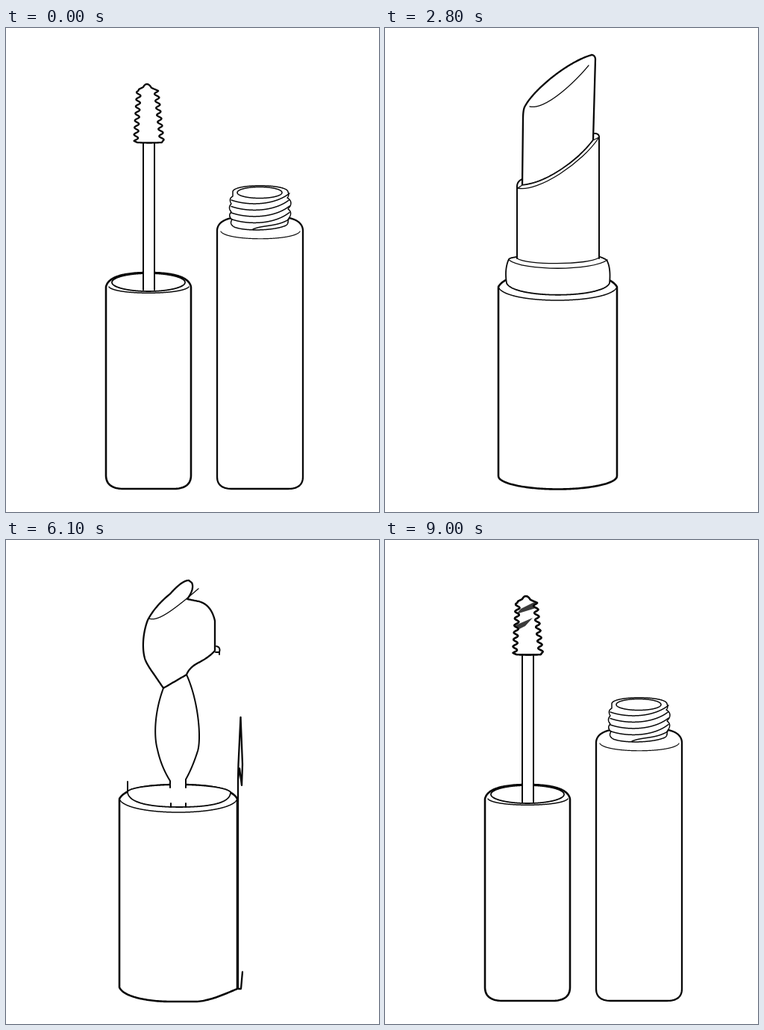
Animation of 500x647 px, one loop 9100 ms. Source, as an HTML page with a canvas:

```html
<!DOCTYPE html>
<html lang="en">
<head>
<meta charset="utf-8">
<title>Mascara and lipstick</title>
<style>
html, body { margin: 0; height: 100%; overflow: hidden; background: #fff; }
canvas { display: block; }
</style>
</head>
<body>
<canvas id="stage" width="500" height="647"></canvas>
<script>
const ctx = document.getElementById('stage').getContext('2d');
const STEP = 100, STEPS = 91, TURN = 73, SAMPLES = 400;
const KEYS = [0, 3, 12, 20];
const INK = '#080808';
ctx.lineJoin = ctx.lineCap = 'round';

const ruler = document.createElementNS('http://www.w3.org/2000/svg', 'path');
function sample(d) {
  ruler.setAttribute('d', d);
  const length = ruler.getTotalLength();
  return Array.from({ length: SAMPLES + 1 }, (_, i) => {
    const p = ruler.getPointAtLength(length * i / SAMPLES);
    return [p.x, p.y];
  });
}

// Poses: mascara, mascara pushed together, half-way shape, lipstick.
const capPush = ([x, y]) => [x * 1.0172 + 17.7, y];
const tubePush = ([x, y]) => [x * 0.817 + 41.7, y];
const squeeze = ([x, y]) => [314 + (x - 341) * 0.03, y + 23];

function part(width, push, mascara, middle, lipstick) {
  const first = sample(mascara);
  const mid = typeof middle === 'function' ? first.map(middle) : sample(middle);
  return { width, poses: [first, first.map(push), mid, lipstick ? sample(lipstick) : mid] };
}

function pose({ poses }, g) {
  const i = g < KEYS[1] ? 0 : g < KEYS[2] ? 1 : 2;
  const k = Math.min(1, (g - KEYS[i]) / (KEYS[i + 1] - KEYS[i]));
  return poses[i].map(([x, y], n) => {
    const [u, v] = poses[i + 1][n];
    return [x + (u - x) * k, y + (v - y) * k];
  });
}

function brushOutline() {
  const wave = (y, top) => 3 * Math.cos((y - top) / 9.4 * 2 * Math.PI);
  let d = 'M189 75Q186 75 184 79L178 82';
  for (let y = 84; y <= 151; y++) d += `L${178 - 0.06 * (y - 84) - wave(y, 86)} ${y}`;
  d += 'L176 153Q192 154 209 153';
  for (let y = 151; y >= 84; y--) d += `L${201.5 + 0.11 * (y - 84) + wave(y, 83.5)} ${y}`;
  return d + 'L195 80Q192 75 189 75Z';
}

const tube = part(2.3, tubePush,
  'M283 270V600Q283 616 303 616H378Q398 616 398 600V270Q397 258 380 254H302Q284 258 283 270Z',
  'M311 320V600H315L317 577L315 600H311V320L313 305L316 328L317 300L314.5 236L311.5 300Z',
  'M311 346V599V346Z');
const neck = [
  'M304 219C304 208 377 208 378 219Q380 224 377 227Q384 231 381 238L378 242Q384 246 380 253L378 256Q379 262 375 264C360 271 320 272 306 266Q299 262 303 256Q297 251 302 246Q297 240 302 235Q298 228 304 225Z',
  'M310 220A30 7.5 0 0 0 370 220A30 7.5 0 0 0 310 220Z',
  ...[0, 1, 2, 3].map(i => {
    const y = 8.5 * i;
    return `M302 ${230 + y}C325 ${238 + y} 360 ${237 + y} 380 ${221 + y}`;
  }),
  'M331 269C345 263 362 266 379 256'
].map(d => part(1.5, tubePush, d, squeeze));
const tubeShoulder = part(1.2, tubePush, 'M288 272C296 285 386 285 394 272', squeeze);

const body = part(2.6, capPush,
  'M134 346V598Q134 616 158 616H224Q248 616 248 598V346Q244 327 191 327Q138 327 134 346Z',
  'M152 346V598C158 612 195 617 220 617H255C275 616 295 606 310 600V346Q300 327 231 327Q162 327 152 346Z',
  'M152 346V599A79.5 17.5 0 0 0 311 599V346Q300 327 231 327Q162 327 152 346Z');
const shoulder = part(1.5, capPush,
  'M138 346C146 357 236 357 245 346',
  'M152 346C160 370 302 370 310 346',
  'M152 346C160 370 302 370 311 346');
const rim = part(1.8, capPush,
  'M142 340A49 12 0 0 0 240 340A49 12 0 0 0 142 340Z',
  'M163 336C163 352 195 357 232 357C280 357 301 350 301 337C290 324 175 324 163 336Z',
  'M166 309Q160 322 163 341C172 362 292 362 301 341Q303 320 297 310Q290 306 287 306H177Q168 307 166 309Z');
const left = part(2, capPush, 'M184 153V350',
  'M211 198C199 230 198 262 203 280Q208 303 220 322V331',
  'M184 202Q177 205 177 212V308');
const right = part(2, capPush, 'M199 153V350',
  'M242 180C258 215 262 265 257 282Q250 304 241 320V331',
  'M281 141Q287 141 287 146V308');
const tip = part(2.3, capPush, brushOutline(),
  'M245 54Q236 54 220 72Q200 88 190 107C183 125 182 148 187 161Q190 168 198 179L211 198L242 180Q246 170 258 164Q272 157 280 148V108Q275 86 258 82L243 79Q253 65 249 57Z',
  'M277 36C245 45 200 82 188 104Q185 108 185 122L184 210C215 208 258 178 279 150L282 41Q281 36 277 36Z');
const highlight = part(1.3, capPush, 'M189 78H190',
  'M192 105C203 109 222 96 258 65',
  'M194 105C215 110 255 72 273 50');

function trace(points) {
  ctx.beginPath();
  points.forEach(p => ctx.lineTo(...p));
}

function stroke(points, width) {
  trace(points);
  ctx.lineWidth = width;
  ctx.stroke();
}

function fill(points, color = '#fff') {
  trace(points);
  ctx.fillStyle = color;
  ctx.fill();
}

function draw(item, g, filled) {
  const points = pose(item, g);
  if (filled) fill(points);
  stroke(points, item.width);
}

function line(d, width = 1.3) {
  ctx.lineWidth = width;
  ctx.stroke(new Path2D(d));
}

function paintLip(k) {
  const shift = (k - 5) * 19;
  ctx.save();
  ctx.clip(new Path2D('M273 40C245 47 202 82 189 104Q186 108 186 122L184 210C215 208 258 178 279 150L278 42Z'));
  ctx.translate(shift * 0.75, shift * 0.66);
  ctx.fillStyle = '#ee4163';
  ctx.fill(new Path2D('M500 -119L300 108Q243 152 205 215L5 442L-300 300V-300Z'));
  ctx.restore();
}

function paintMascara(k) {
  const dark = '#3b3b3b', stem = [...pose(left, 0), ...pose(right, 0).reverse()];
  ctx.save();
  const clip = new Path2D();
  for (const shape of [pose(tip, 0), stem]) {
    const outline = new Path2D();
    shape.forEach(p => outline.lineTo(...p));
    clip.addPath(outline);
  }
  ctx.clip(clip);
  if (k === 1) {
    fill([[176, 99], [182, 92], [202, 82], [202, 91]], dark);
    fill([[170, 124], [175, 114], [198, 104], [188, 115]], dark);
  } else {
    const y = k < 5 ? 113 + (k - 2) * 24 : 161 + (k - 4) * 41;
    fill([[160, 0], [220, 0], [220, y - 27], [160, y + 27]], dark);
  }
  ctx.restore();
  [tip, left, right].forEach(item => draw(item, 0));
}

function drawSleeveEdges() {
  const edge = 'M184 210C215 208 258 178 279 150L287 146C265 180 205 220 178 214Z';
  ctx.fillStyle = '#fff';
  ctx.fill(new Path2D(edge));
  line(edge + 'M177 308C190 317 270 317 287 307');
}

function render(f) {
  const g = f <= 36 ? f : Math.max(0, TURN - f);
  const coat = f > TURN ? Math.min(f - TURN, STEPS - f) : 0;
  ctx.fillStyle = '#fff';
  ctx.fillRect(0, 0, 500, 647);
  ctx.strokeStyle = INK;

  if (g < 15) draw(tube, g, true);
  if (g < 12) {
    draw(tubeShoulder, g);
    neck.forEach((item, i) => draw(item, g, i === 0));
  }
  draw(body, g, true);
  draw(shoulder, g);
  draw(rim, g, true);
  if (g > 15) line('M166 310C185 325 278 325 298 310');

  fill([...pose(left, g), ...pose(right, g).reverse()]);
  draw(left, g);
  draw(right, g);
  draw(tip, g, true);
  if (g > 30) {
    paintLip(g - 30);
    draw(tip, g);
  }
  if (g > 7) draw(highlight, g);
  if (g > 9 && g < 15) line('M163 323V336M281 150H286V153M286 150Q288 143 282 142M221 352V357M241 352V357', 2);
  if (g > 15) drawSleeveEdges();
  if (coat) paintMascara(coat);
}

function tick() {
  render(Math.floor(performance.now() / STEP) % STEPS);
  requestAnimationFrame(tick);
}
tick();
</script>
</body>
</html>
```
